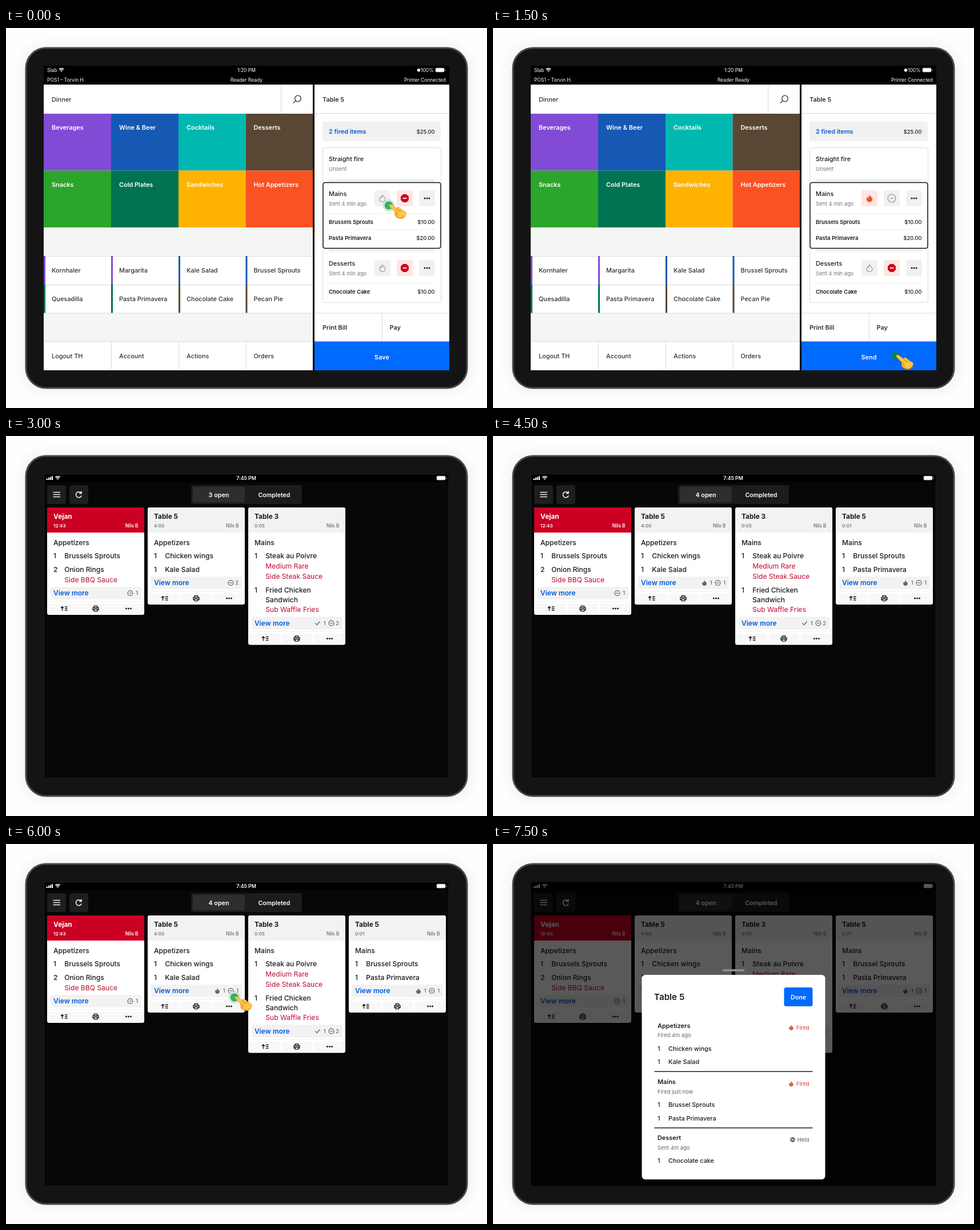
Recreate the animation shown at these times as an HTML page. Size 842x665 px, loop 9000 ms.

```html
<!DOCTYPE html>
<html lang="en">
<head>
<meta charset="utf-8">
<title>Coursing: point of sale and kitchen display</title>
<style>
html, body { margin: 0; width: 100%; height: 100%; overflow: hidden; background: #fefefe; }
svg { display: block; width: 100%; height: 100%; }
text { font-family: Inter, "Noto Sans", sans-serif; white-space: pre; }
</style>
</head>
<body>
<svg id="stage" viewBox="0 0 842 665" xmlns="http://www.w3.org/2000/svg"></svg>
<script>
const STEP = 1500, STEPS = 6;
const INK = '#1b1b1b', SLATE = '#2b3238', GREY = '#757575', BLUE = '#005ad9', RED = '#cc0023', LINE = '#d9dada';

// Basic shapes
const rect = (x, y, w, h, fill, r = 0, more = '') =>
  `<rect x="${x}" y="${y}" width="${w}" height="${h}" rx="${r}" fill="${fill}" ${more}/>`;
const text = (x, y, str, size, weight = 500, fill = INK, anchor = 'start') =>
  `<text x="${x}" y="${y}" font-size="${size}" font-weight="${weight}" fill="${fill}" text-anchor="${anchor}">${str.replace('&', '&amp;')}</text>`;
const path = (d, stroke, width = 1, fill = 'none', more = '') =>
  `<path d="${d}" fill="${fill}" stroke="${stroke}" stroke-width="${width}" ${more}/>`;
const circle = (x, y, r, fill, more = '') => `<circle cx="${x}" cy="${y}" r="${r}" fill="${fill}" ${more}/>`;
const at = (x, y, body, scale = 1) => `<g transform="translate(${x} ${y}) scale(${scale})">${body}</g>`;
const show = (steps, body) => `<g data-steps="${steps}">${body}</g>`;
const hline = (x1, x2, y, stroke = LINE, w = 1) => path(`M${x1} ${y}H${x2}`, stroke, w);
const vline = (x, y1, y2, stroke = LINE) => path(`M${x} ${y1}V${y2}`, stroke);

// Icons, centred on the given point
const FLAME = 'M-.3-6.5C.2-3.6 5.2-2.4 5.2 2C5.2 4.900 3 6.500 0 6.500S-5.200 4.700-5.200 2C-5.200 0-4.300-1.600-3.200-2.800C-2.800-1.300-2.300-.8-1.700-.8C-.6-1.800-1-4.300-.3-6.500Z';
const flame = (x, y, fill, scale = 1) => at(x, y, path(FLAME, 'none', 0, fill), scale);
const flameLine = (x, y) => at(x, y, path(FLAME, '#999', 1.3), .95);
const OCTAGON = 'M-2.900-7H2.900L7-2.900V2.900L2.900 7H-2.900L-7 2.900V-2.900Z';
const stop = (x, y) => at(x, y, path(OCTAGON, 'none', 0, RED) + hline(-3.2, 3.2, 0, '#fff', 1.8));
const stopLine = (x, y) => at(x, y, path(OCTAGON, '#999', 1.3) + hline(-3, 3, 0, '#999', 1.3), .95);
const dots = (x, y) => [-4, 0, 4].map(d => circle(x + d, y, 1.5, INK)).join('');
const held = (x, y) => circle(x, y, 4.4, 'none', 'stroke="#666" stroke-width="1.3"') + hline(x - 2.2, x + 2.2, y, '#666', 1.3);
const check = (x, y) => path(`M${x - 4} ${y}l2.800 3l5.400-6`, '#666', 1.4);
const wifi = (x, y) => at(x, y,
  path('M-4.300-1.200A6.200 6.200 0 0 1 4.300-1.200M-2.500.8A3.600 3.600 0 0 1 2.500.8', '#fff', 1.4) + path('M-1.300 2.100Q0 1.100 1.300 2.100L0 3.700Z', 'none', 0, '#fff'));
const battery = (x, y) => rect(x, y, 15, 7, '#fff', 1.5, 'stroke="#999" stroke-width=".8"') + rect(x + 16, y + 2.3, 1.2, 2.6, '#aaa', .6);
const raise = (x, y) => path(`M${x - 3} ${y + 4}v-7.500m-2.700 2.700l2.700-2.700l2.700 2.700M${x + 1.5} ${y - 3}h4.500m-4.500 3h4.500m-4.500 3h4.500`, INK, 1.4);
const printer = (x, y) =>
  path(`M${x - 2.7} ${y - 1.5}v-3h5.400v3M${x - 2.7} ${y + 2.5}h-2.300v-4h10v4h-2.300M${x - 2.7} ${y + 1}h5.400v3.600h-5.400z`, INK, 1.4);

function cursor(x, y, dark) {
  const halo = dark ? circle(0, 0, 10, '#0a60e4', 'opacity=".5"') : circle(0, 0, 10, '#e3e5e3', 'stroke="#c4c7c4" stroke-width="1" opacity=".9"');
  const hand = 'M1.600-1.200C2.800-2.500 4.500-1.700 5.700-.8L13.500 4.800C15 2.500 17 2.400 18.700 4L24.500 8.700C27.500 9.500 29.500 11.500 30.800 13.500L28.500 19.500L24.500 22.500C20 23.600 15 21.800 12.400 19.800C10.400 18.300 10 16.500 11.300 15.200C9.700 13.600 9.700 12.300 10.900 11L2.300 2.700C.9 1.400.7 0 1.600-1.200Z';
  return at(x, y, halo + circle(0, 0, 7.3, dark ? '#0b7d68' : '#2eb560') +
    path(hand, '#e69a2e', .7, '#fdc644') +
    path('M10.900 11L15.500 14.500M11.300 15.200L16 18.200M14 5C15.500 9 18.500 10 22 9.500', '#dd8527', 1.1, 'none', 'stroke-linecap="round"') +
    path('M12.800 19.500C16 22.300 20 23 24 22.100L28 19', '#e9952d', 1.3));
}

function tablet() {
  const shadow = [20, 14, 9, 5].map(d =>
    rect(34 - d, 36 - d, 774 + 2 * d, 595 + 2 * d, '#000', 36 + d, 'opacity=".006"')).join('');
  return shadow + rect(35, 35, 772, 595, '#141414', 35, 'stroke="#474747" stroke-width="3"');
}

function tiles() {
  const cols = [66, 184, 302, 419.5, 537];
  const menu = [
    ['Beverages', '#814bd6'], ['Wine &amp; Beer'.replace('&amp;', '&'), '#1659b4'], ['Cocktails', '#00b8b0'], ['Desserts', '#594734'],
    ['Snacks', '#2ba52b'], ['Cold Plates', '#007353'], ['Sandwiches', '#ffb300'], ['Hot Appetizers', '#fa5222']];
  const items = [
    ['Kornhaler', 0], ['Margarita', 0], ['Kale Salad', 1], ['Brussel Sprouts', 1],
    ['Quesadilla', 5], ['Pasta Primavera', 5], ['Chocolate Cake', 3], ['Pecan Pie', 3]];
  let out = '';
  menu.forEach(([name, fill], i) => {
    const c = i % 4, y = i < 4 ? 150 : 249.5;
    out += rect(cols[c], y, cols[c + 1] - cols[c], 99.5, fill) + text(cols[c] + 14, y + 28, name, 10.9, 600, '#fff');
  });
  items.forEach(([name, tone], i) => {
    const c = i % 4, y = i < 4 ? 399 : 449;
    out += rect(cols[c], y, cols[c + 1] - cols[c], 50, '#fff') + hline(cols[c], cols[c + 1], y + .5) +
      rect(cols[c], y, 3, 50, menu[tone][1]) + text(cols[c] + 14, y + 28.8, name, 10.9, 500, SLATE);
  });
  out += hline(66, 537, 499) + rect(66, 548.5, 471, 50.5, '#fff') + hline(66, 537, 548.5);
  ['Logout TH', 'Account', 'Actions', 'Orders'].forEach((name, c) => {
    out += text(cols[c] + 14, 577.5, name, 10.9, 500, SLATE) + (c ? vline(cols[c] + .5, 549, 599) : '');
  });
  return out;
}

function check5() {
  const price = (y, sum) => text(750.5, y, sum, 9.3, 500, INK, 'end');
  const dish = (y, name, sum) => text(565, y, name, 9.5, 600) + price(y, sum);
  const head = (y, name, note) => text(565, y, name, 10.9, 500) + text(565, y + 17, note, 9.3, 400, GREY);
  const keys = (y, fired) =>
    rect(645, y, 28, 28, fired ? '#ffe6e0' : '#f1f1f1', 3.5) + rect(684, y, 28, 28, fired ? '#f1f1f1' : '#ffe6e0', 3.5) +
    rect(723, y, 28, 28, '#f1f1f1', 3.5) + dots(737, y + 14) +
    (fired ? flame(659, y + 14, '#f6512b') + stopLine(698, y + 14) : flameLine(659, y + 14) + stop(698, y + 14));
  return rect(540, 99, 236, 500, '#fff') + text(554, 129, 'Table 5', 10.9, 600, SLATE) + hline(540, 776, 149.5) +
    rect(554, 163.5, 207, 34.500, '#f1f1f1', 4) + text(565, 185, '2 fired items', 10.9, 600, BLUE) + price(184.5, '$25.00') +
    rect(554.5, 209.5, 207, 271, '#fff', 4, 'stroke="#dcdcdc"') + head(233, 'Straight fire', 'Unsent') +
    rect(565, 264.5, 185, 6, '#efefef') + rect(565, 385, 185, 6.500, '#efefef') +
    rect(555, 270.5, 206, 115, '#fff', 3.5, 'stroke="#111" stroke-width="1.5"') +
    head(294, 'Mains', 'Sent 4 min ago') + show('0', keys(284, false)) + show('1', keys(284, true)) +
    hline(565, 750, 325, '#eee') + dish(343, 'Brussels Sprouts', '$10.00') +
    hline(565, 750, 353, '#eee') + dish(370.5, 'Pasta Primavera', '$20.00') +
    head(416, 'Desserts', 'Sent 4 min ago') + keys(406, false) +
    hline(565, 750, 447, '#eee') + dish(465, 'Chocolate Cake', '$10.00') +
    hline(540, 776, 499) + vline(658.5, 499, 549) +
    text(554, 528, 'Print Bill', 10.9, 600, SLATE) + text(671.5, 528, 'Pay', 10.9, 600, SLATE) +
    rect(540, 548.5, 236, 50.5, '#006aff') +
    show('0', text(658, 579.5, 'Save', 10.9, 600, '#fff', 'middle')) +
    show('1', text(658, 579.5, 'Send', 10.9, 600, '#fff', 'middle'));
}

function sale() {
  const note = (x, y, str, anchor) => text(x, y, str, 8.5, 400, '#fff', anchor);
  return rect(66, 66, 710, 533, '#000') +
    note(72, 76.5, 'Slab') + wifi(97, 73.5) + note(421, 76.5, '1:20 PM', 'middle') +
    circle(722.5, 73.7, 2.8, '#fff') + note(748.5, 76.5, '100%', 'end') + battery(752, 70) +
    note(72, 93.5, 'POS1 – Torvin H.') + note(421, 93.5, 'Reader Ready', 'middle') + note(770, 93.5, 'Printer Connected', 'end') +
    rect(66, 99, 471, 500, '#f4f5f5') + rect(66, 99, 471, 51, '#fff') + vline(481.5, 99, 150) +
    text(80, 129, 'Dinner', 10.9, 500, SLATE) +
    circle(511, 123.5, 5.3, 'none', 'stroke="#333" stroke-width="1.3"') + path('M507.200 127.300L502.800 131.500', '#333', 1.3) +
    tiles() + check5();
}

// Ticket lines: [baseline, text, quantity]; lines without a quantity continue, "+" marks a modifier
function ticket(x, { title, time, course, lines, bar, late, tags }) {
  const ink = late ? '#fff' : INK, soft = late ? '#fff' : '#6a6a6a', foot = bar + 38;
  let out = rect(x, 125, 170, bar + 49 - 125, '#fff', 3.5) +
    path(`M${x} 169V128.500q0-3.500 3.500-3.500h163q3.500 0 3.500 3.500V169Z`, 'none', 0, late ? RED : '#f2f2f2') +
    text(x + 11, 145, title, 11.9, 700, ink) + text(x + 11, 160, time, 8.1, late ? 600 : 500, soft) +
    text(x + 159.5, 160, 'Nils B', 8.3, late ? 600 : 500, soft, 'end') + text(x + 11, 190.5, course, 12.1, 500);
  for (const [y, str, qty] of lines) {
    const extra = str[0] === '+';
    if (qty) out += text(x + 11, y, qty, 12.1, 500);
    out += text(x + 30.3, y, extra ? str.slice(1) : str, 12.1, extra ? 400 : 500, extra ? '#bf0a30' : INK);
  }
  out += rect(x + 5.5, bar, 159.5, 22, '#f2f2f2', 3.5) + text(x + 11, bar + 15.2, 'View more', 12, 600, BLUE) +
    tags(x, bar + 11) + hline(x, x + 170, bar + 25.5, '#f0f0f0');
  [3, 59, 115].forEach(d => out += rect(x + d, foot - 8.5, 53, 17, '#f8f8f8', 3));
  return out + raise(x + 29.5, foot) + printer(x + 85, foot) + dots(x + 142.5, foot);
}

function kitchen() {
  const count = (x, y, n) => text(x, y + 3.3, n, 9.3, 500, '#666', 'end');
  const heldTag = n => (x, y) => held(x + 145.5, y) + count(x + 159, y, n);
  const firedTag = (x, y) => flame(x + 122, y, '#666', .75) + count(x + 135.5, y, '1') + heldTag('1')(x, y);
  const doneTag = (x, y) => check(x + 121.5, y) + count(x + 135.5, y, '1') + heldTag('2')(x, y);
  const open = str => text(372.5, 107, str, 10.8, 600, '#fff', 'middle');
  let bars = '';
  for (let i = 0; i < 4; i++) bars += rect(70.5 + i * 3.1, 74.5 - i * 1.4, 2.2, 2.5 + i * 1.4, '#fff', .5);
  return rect(66.5, 66.5, 709, 532, '#070707', 5, 'stroke="#1f1f1f"') + rect(67, 67, 708, 13.5, '#000', 4) +
    bars + wifi(90.5, 73.5) + text(420.5, 76.8, '7:45 PM', 8.7, 600, '#fff', 'middle') + battery(754, 70) +
    rect(72, 86, 33, 33, '#1e1e1e', 4) + rect(111, 86, 33, 33, '#1e1e1e', 4) +
    [98.5, 102.5, 106.5].map(y => hline(82.5, 95, y, '#fff', 1.4)).join('') +
    path('M131.300 99.500A5 5 0 1 0 132.200 104.200M132 96.500V100.500H128', '#fff', 1.5) +
    rect(324, 86, 194, 33, '#1c1c1c', 4) + rect(327, 89, 91, 27, '#2e2e2e', 3) +
    show('2', open('3 open')) + show('345', open('4 open')) + text(469.5, 107, 'Completed', 10.6, 600, '#fff', 'middle') +
    ticket(72, { title: 'Vejan', time: '12:43', course: 'Appetizers', bar: 264, late: true, tags: heldTag('1'),
      lines: [[214, 'Brussels Sprouts', '1'], [238, 'Onion Rings', '2'], [255.5, '+Side BBQ Sauce']] }) +
    ticket(248, { title: 'Table 5', time: '4:00', course: 'Appetizers', bar: 246,
      tags: (x, y) => show('2', heldTag('2')(x, y)) + show('345', firedTag(x, y)),
      lines: [[214, 'Chicken wings', '1'], [238, 'Kale Salad', '1']] }) +
    ticket(424, { title: 'Table 3', time: '0:05', course: 'Mains', bar: 316.5, tags: doneTag,
      lines: [[214, 'Steak au Poivre', '1'], [232, '+Medium Rare'], [250, '+Side Steak Sauce'],
        [273.5, 'Fried Chicken', '1'], [290.5, 'Sandwich'], [308, '+Sub Waffle Fries']] }) +
    show('345', ticket(600, { title: 'Table 5', time: '0:01', course: 'Mains', bar: 246, tags: firedTag,
      lines: [[214, 'Brussel Sprouts', '1'], [238, 'Pasta Primavera', '1']] }));
}

function sheet() {
  const courses = [
    [321.5, 'Appetizers', 'Fired 4m ago', ['Chicken wings', 'Kale Salad'], true],
    [420, 'Mains', 'Fired just now', ['Brussel Sprouts', 'Pasta Primavera'], true],
    [518, 'Dessert', 'Sent 4m ago', ['Chocolate cake'], false]];
  let out = rect(66, 66, 710, 533, '#000', 5, 'opacity=".65"') + rect(401.5, 219, 39, 4, '#8b8b8b', 2) +
    rect(260.5, 229, 321, 358, '#fff', 6) + text(282, 273, 'Table 5', 15.2, 600) +
    rect(509.5, 251, 50, 33, '#006aff', 3.5) + text(534.5, 271.5, 'Done', 10.7, 600, '#fff', 'middle');
  for (const [y, name, note, dishes, fired] of courses) {
    const tone = fired ? '#dd5a45' : '#6f6f6f';
    out += text(288, y, name, 10.9, 600) + text(288, y + 16.7, note, 9.4, 400, '#666') +
      text(553.5, y + 3, fired ? 'Fired' : 'Held', 9.4, 500, tone, 'end') +
      (fired ? flame(522, y - .5, tone, .72) : circle(524.5, y - .5, 4.4, tone) + hline(522.3, 526.7, y - .5, '#fff', 1.4));
    dishes.forEach((dish, i) => {
      const base = y + 40 + i * 23.6;
      out += text(288, base, '1', 10.8, 500) + text(307, base, dish, 10.8, 500);
    });
    if (fired) out += hline(282.5, 559.5, y + 76.7, '#1e1e1e', 1.5);
  }
  return out;
}

const stage = document.getElementById('stage');
stage.innerHTML = tablet() + show('01', sale()) + show('2345', kitchen()) + show('5', sheet()) +
  show('0', cursor(670, 310.5)) + show('1', cursor(705, 574, true)) + show('4', cursor(400, 268.5));
const parts = [...stage.querySelectorAll('[data-steps]')];

function render(ms) {
  const step = String(Math.floor(ms / STEP) % STEPS);
  for (const p of parts) p.style.display = p.dataset.steps.includes(step) ? '' : 'none';
}

const start = performance.now();
function tick() {
  render(performance.now() - start);
  requestAnimationFrame(tick);
}
tick();
</script>
</body>
</html>
```
